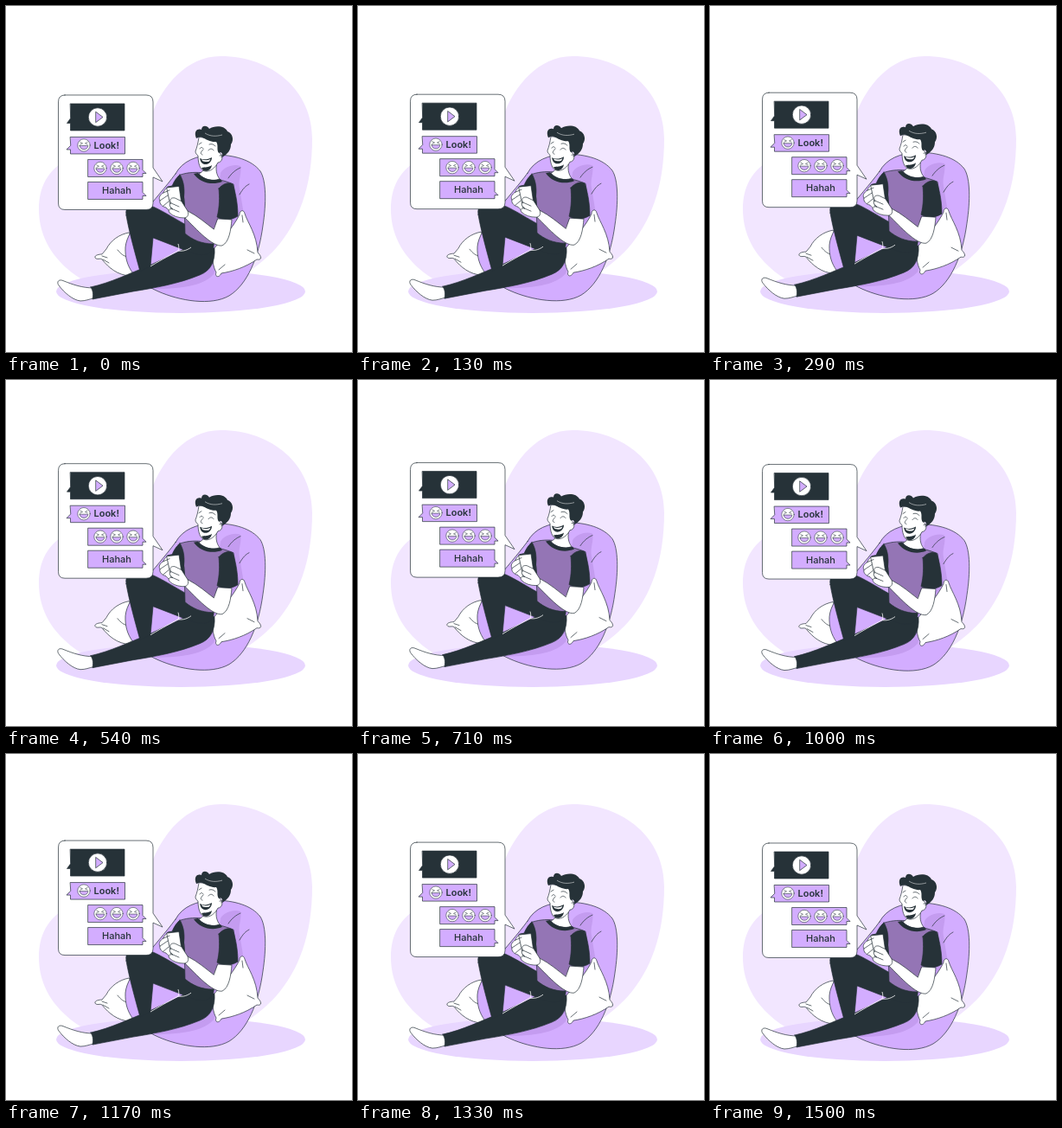
Animation of 400 by 400 pixels, one loop 1.54 s. Source, as an HTML page:

```html
<!DOCTYPE html>
<html lang="en">
<head>
<meta charset="utf-8">
<title>Chat on a beanbag</title>
<style>
  html, body { margin: 0; width: 100%; height: 100%; overflow: hidden; background: #fff; }
  svg { display: block; width: 100vw; height: 100vh; }
  .line { stroke: #263238; stroke-width: .7; stroke-linejoin: round; stroke-linecap: round; }
  .thin { stroke-width: .55; }
  .none { fill: none; }
  .white { fill: #fff; }
  .dark { fill: #263238; }
  .lilac { fill: #d3adff; }
  .shade { fill: #c49cf0; }
  .shirt { fill: #9475b5; }
  text { font: 600 11px Inter, "Open Sans", sans-serif; fill: #263238; }
  .light { font-weight: 500; }
</style>
</head>
<body>
<svg viewBox="0 0 400 400">
  <defs>
    <g id="laugh" class="line thin">
      <circle r="7.200" class="white"/>
      <path class="none" d="M-4.200-3.600-1.500-2.200-4.200-1M4.200-3.600 1.500-2.200 4.200-1"/>
      <path class="lilac" d="M-4.800.500H4.800C4.500 6.300-4.500 6.300-4.800.500Z"/>
    </g>
    <path id="rightNote" class="lilac line" d="M95 177.500H158V189.500L162 193.500H158V197.500H95Z"/>
  </defs>

  <path fill="#f2e6ff" d="M38 235C38 205 52 185 78 174C120 157 156 146 170 122C181 94 208 58 248 58C308 58 354 98 354 153C354 210 338 250 313 279C290 305 240 340 180 340C105 340 38 299 38 235Z"/>
  <ellipse fill="#e8d6ff" cx="202" cy="330" rx="144" ry="25"/>

  <g id="floating">
    <!-- Beanbag and cushions -->
    <path class="white line" d="M142 262C131 264 121 271 116 281L111 287C108 287 102 288 103 291C105 294 109 291 111 293C119 303 129 311 143 312L160 300Z"/>
    <path class="none line" d="M111 289 117 291M112 293 119 297M129 282C133 287 136 289 140 290"/>
    <path class="lilac line" d="M196 194C204 179 220 173 240 172C264 172 284 178 294 191C301 202 301 228 297 254C292 291 279 322 258 335C237 347 201 341 176 330C149 318 137 302 138 279C140 256 173 225 196 194Z"/>
    <path class="shade" d="M248 193C252 186 263 182 271 185C273 194 268 201 270 211L275 241L252 277L240 310C230 322 207 327 172 327C193 318 212 314 238 280Z"/>
    <path class="none line" d="M257 199C261 193 266 189 271 187M270 218C274 211 277 208 281 206"/>
    <path class="white line" d="M240 281C252 267 264 254 270 241C270 236 275 235 276 240C279 250 290 264 291 285C296 290 296 294 290 293C277 302 262 307 249 309C246 315 241 313 243 308C239 301 238 291 240 281Z"/>
    <path class="none line" d="M273 242 274 250M287 286 279 282M246 305 253 299"/>

    <!-- Legs -->
    <path class="white line" d="M101 326C88 326 77 322 67 318C61 315 58 319 61 323C67 331 77 340 86 341C92 341 96 339 101 338Z"/>
    <path class="dark line" d="M98 325C121 320 143 309 166 300L210 279L241 280C242 295 237 306 224 311C200 321 172 326 147 330L100 339C101 334 101 330 98 325Z"/>
    <path class="dark line" d="M139 242C137 230 146 227 156 228C168 229 182 238 208 253L240 272C242 287 230 291 214 285L170 268L167 301L155 307C149 285 142 260 139 242Z"/>
    <path fill="none" stroke="#fff" stroke-width=".8" d="M167 301C182 292 190 288 199 283C200 281 200 278 199 275M199 283C205 284 210 282 214 279"/>

    <!-- Torso -->
    <path class="shirt line" d="M202 195C211 192 221 192 228 193C239 200 251 201 263 206C266 220 263 235 258 247C253 259 248 269 239 275C226 275 215 270 207 263L206 224Z"/>
    <path class="dark line" d="M201 195C196 199 193 205 190 213L205 224C207 214 206 203 201 195Z"/>
    <path class="dark line" d="M246 211C250 206 257 203 262 206C266 217 268 231 268 243C260 248 252 248 244 244C247 232 247 221 246 211Z"/>
    <path class="white line" d="M230 184C230 189 227 192 223 194C229 201 239 203 247 200C243 195 242 188 244 181Z"/>
    <path class="dark" d="M222 193C227 200 240 203 248 200L250 203C238 208 224 204 217 194Z"/>
    <path class="white line" d="M245 246 261 247C260 259 258 273 250 277C239 279 220 258 207 245L210 237C222 243 232 252 240 258Z"/>

    <!-- Head -->
    <path class="white line" d="M223 152C222 158 221 163 219 168C219 171 221 172 222 173C222 181 224 190 230 191C236 192 242 187 245 181C250 181 252 173 247 170L247 154Z"/>
    <path class="dark" d="M220 153C217 146 220 141 226 143C226 138 232 137 235 142C241 138 253 138 256 145C262 147 264 155 260 160C260 167 256 171 250 175C251 171 249 168 246 170C243 166 246 161 243 157C238 158 231 154 227 152C224 151 222 152 220 153Z"/>
    <path fill="none" stroke="#fff" stroke-width=".5" d="M230 147C236 151 243 151 250 149"/>
    <path class="dark" d="M224 176C228 178 233 178 238 175C238 180 234 184 229 183C226 182 225 180 224 176ZM226 187C230 186 234 187 238 184C237 190 232 192 228 190Z"/>
    <path class="white" d="M226 177.300C230 179 233 178.500 236.500 177L235 179.500C232 180.500 229 180 227 179Z"/>
    <path class="none line" d="M224 165C225 163 227 163 228 165M234 167C236 164 239 165 240 167M223 160 226 158M235 160C238 159 240 160 242 162M228 166C225 169 224 171 227 172M247 173C249 172 250 173 249 175"/>

    <!-- Hands and phone -->
    <path class="white line" d="M193 208C187 208 183 212 182 216C178 218 176 222 178 225C177 229 181 232 185 233C190 239 195 242 201 240L202 222Z"/>
    <path class="dark line" d="M187 209 202 207Q204 207 204 209L207 235Q207 238 204 238L192 236Z"/>
    <path class="white line" d="M186 210 200 208.500 204 236 191 234Z"/>
    <path class="white line" d="M203 226 210 237C212 242 209 245 206 245C199 245 193 243 189 239C187 236 189 234 193 235C189 232 188 229 191 228C188 224 191 221 195 222Z"/>
    <path class="none line" d="M193 235 200 238M191 228 200 232M182 216 189 213M178 225 187 219M182 231 188 226"/>

    <!-- Conversation -->
    <path class="white line" d="M68 103H162Q170 103 170 111V187L181 203L170 198V228Q170 235.500 162 235.500H68Q60.500 235.500 60.500 228V111Q60.500 103 68 103Z"/>
    <path class="dark line" d="M74.500 113H137V144H74.500V135.500H70.500L74.500 130Z"/>
    <circle class="white line" cx="106" cy="128.500" r="10.700"/>
    <path class="lilac line" d="M104 122.500 112 128.500 104 134.500Z"/>
    <path class="lilac line" d="M74.500 151.500H137.500V171H74.500V166H70L74.500 161.500Z"/>
    <use href="#laugh" x="90" y="161"/>
    <text x="101.500" y="164.800">Look!</text>
    <use href="#rightNote"/>
    <use href="#laugh" x="109" y="187.500"/>
    <use href="#laugh" x="128" y="187.500"/>
    <use href="#laugh" x="147" y="187.500"/>
    <use href="#rightNote" y="26"/>
    <text class="light" x="111" y="217">Hahah</text>
  </g>
</svg>
<script>
  const LOOP = 1540, LIFT = 7.4, LEAD = 35;
  const floating = document.getElementById("floating");

  function draw(now) {
    const phase = (now + LEAD) % LOOP / LOOP;
    const y = -LIFT * (1 - Math.cos(2 * Math.PI * phase)) / 2;
    floating.setAttribute("transform", `translate(0 ${y})`);
    requestAnimationFrame(draw);
  }
  draw(0);
</script>
</body>
</html>
```
